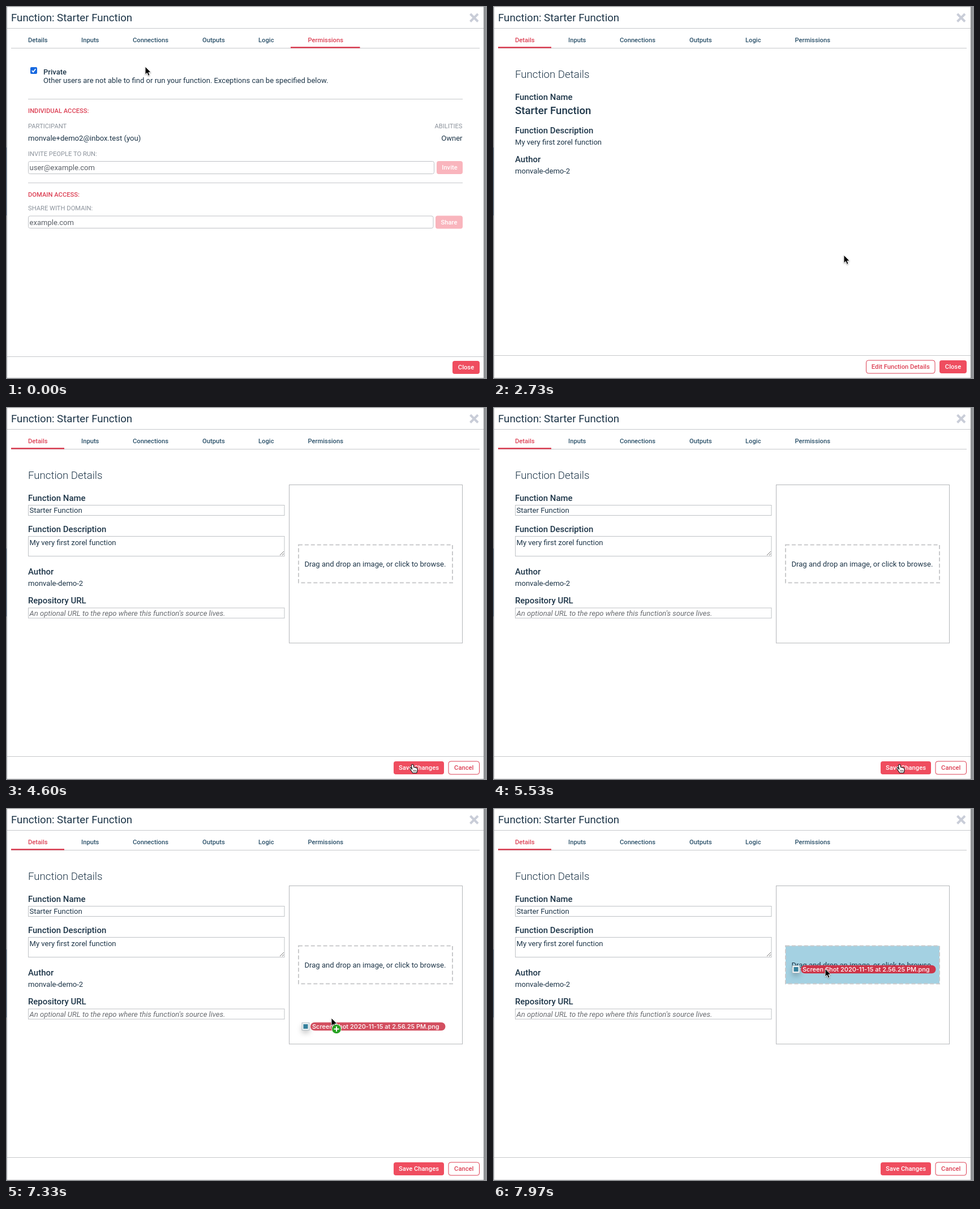
An HTML page that plays this animation: 850 by 659 pixels, repeating every 8000 ms.

```html
<!DOCTYPE html>
<html lang="en">
<head>
<meta charset="utf-8">
<title>Function settings</title>
<style>
html, body { margin: 0; width: 100%; height: 100%; overflow: hidden; background: #fff; }
svg { display: block; width: 850px; height: 659px; font-family: Roboto, sans-serif; }
text { white-space: pre; }
</style>
</head>
<body>
<svg id="stage" viewBox="0 0 850 659" xmlns="http://www.w3.org/2000/svg"></svg>
<script>
const LOOP = 8000;
const NAVY = '#1d3548', TAB = '#2a5069', RED = '#dc4054', BUTTON = '#ef4d5f', GREY = '#8b929b', RULE = '#c6c8cb';
const BODY = 13.05, SMALL = 11.2, LABEL = 14.95, HEAD = 18.65;

const TABS = [['Details', 39], ['Inputs', 133], ['Connections', 224], ['Outputs', 347], ['Logic', 446], ['Permissions', 533.5]];

// Cursor stops: time, x, y of the hot spot
const PATH = [
  [0, 246, 107], [80, 246, 107], [1050, 54, 58], [1900, 54, 58], [2640, 620, 440], [2800, 620, 440],
  [3560, 718, 633], [5560, 718, 633], [5900, 705, 664], [6700, 700, 664], [7330, 575, 371], [7850, 587, 284], [8000, 587, 284]
];
const DETAILS_AT = 1800, EDIT_AT = 4060, DRAG_AT = 6700, DROP_AT = 7850;

const text = (str, x, y, size = BODY, weight = 400, fill = NAVY, extra = '') =>
  `<text x="${x}" y="${y}" font-size="${size}" font-weight="${weight}" fill="${fill}" ${extra}>${str}</text>`;
const rect = (x, y, w, h, fill, extra = '') =>
  `<rect x="${x}" y="${y}" width="${w}" height="${h}" fill="${fill}" ${extra}/>`;
const rule = (x1, x2, y, color = RULE) => rect(x1, y - .5, x2 - x1, 1, color);
const field = (x, y, w, h, r = 0) => rect(x + .5, y + .5, w - 1, h - 1, '#fff', `rx="${r}" stroke="#bfc2c6"`);
const group = (id, body) => `<g id="${id}">${body}</g>`;

function button(label, x, y, w, solid = true, fill = BUTTON) {
  const box = solid ? rect(x, y, w, 23, fill, 'rx="4"')
                    : rect(x + .5, y + .5, w - 1, 23, '#fff', `rx="4" stroke="${RED}"`);
  return box + text(label, x + w / 2, y + 15.3, SMALL, 500, solid ? '#fff' : RED, 'text-anchor="middle"');
}

const frame = rect(0, 0, 850, 659, '#919396') + rect(0, 250, 1.2, 120, '#5d6b7d') +
  rect(844, 0, 1, 659, '#85878a') + rect(2, 1.5, 842, 655.5, '#fff') +
  text('Function: Starter Function', 9, 27, HEAD) + rule(2, 844, 39.5) +
  '<path d="M820.5 14l13.5 13.5M834 14l-13.5 13.5" stroke="#c9cdd8" stroke-width="4"/>' +
  rule(9, 837, 74.5) +
  TABS.map(([name, x], i) => text(name, x, 64, SMALL, 500, TAB, `id="tab${i}"`)).join('');

const permissions =
  rect(43, 108, 12, 12, '#1769e0', 'rx="2"') +
  '<path d="M45.8 114.2l2.3 2.4 4.2-5.4" fill="none" stroke="#fff" stroke-width="1.7"/>' +
  text('Private', 66, 121, BODY, 500) +
  text('Other users are not able to find or run your function. Exceptions can be specified below.', 66, 136) +
  rule(39, 807, 164.5) +
  text('INDIVIDUAL ACCESS:', 39, 189, SMALL, 500, RED) +
  text('PARTICIPANT', 39, 216, SMALL, 400, GREY) +
  text('ABILITIES', 806.5, 216, SMALL, 400, GREY, 'text-anchor="end"') +
  text('monvale+demo2@inbox.test (you)', 39, 238) +
  text('Owner', 806.5, 238, BODY, 400, NAVY, 'text-anchor="end"') +
  text('INVITE PEOPLE TO RUN:', 39, 265, SMALL, 400, GREY) +
  field(39, 274, 718, 23, 3) + text('user@example.com', 41.5, 290, BODY, 400, '#5b6067') +
  button('Invite', 761, 274, 46, true, '#f9b5bd') +
  rule(39, 807, 312.5) +
  text('DOMAIN ACCESS:', 39, 337, SMALL, 500, RED) +
  text('SHARE WITH DOMAIN:', 39, 361, SMALL, 400, GREY) +
  field(39, 370.5, 716.5, 22.5, 3) + text('example.com', 41.5, 386.5, BODY, 400, '#5b6067') +
  button('Share', 759, 370.5, 48, true, '#f9b5bd') +
  rule(2, 844, 619.5) + button('Close', 789, 627, 48);

const heading = text('Function Details', 39, 127, HEAD, 300) + text('Function Name', 39, 166, LABEL, 500) + rule(2, 844, 617.5);

const details = heading +
  text('Starter Function', 39, 191, HEAD, 500) +
  text('Function Description', 39, 225, LABEL, 500) + text('My very first zorel function', 39, 244.5) +
  text('Author', 39, 276, LABEL, 500) + text('monvale-demo-2', 39, 296) +
  rect(658, 626, 124, 25, '#d9a0a8', 'id="glow" rx="5" style="filter:blur(1.2px)"') +
  button('Edit Function Details', 659, 625.5, 122.5, false) + button('Close', 789, 626, 48);

const edit = heading +
  field(39, 173, 453.5, 19) + text('Starter Function', 41.5, 187) +
  text('Function Description', 39, 221, LABEL, 500) +
  field(39, 228, 453.5, 36) + text('My very first zorel function', 41.5, 243.5) +
  '<path d="M484 262l7-7M488 262l3-3" stroke="#777"/>' +
  text('Author', 39, 296, LABEL, 500) + text('monvale-demo-2', 39, 315.5) +
  text('Repository URL', 39, 347, LABEL, 500) + field(39, 354.5, 453.5, 19) +
  text("An optional URL to the repo where this function's source lives.", 41.5, 368.7, BODY, 400, '#686b70', 'font-style="italic"') +
  rect(500.5, 137.5, 306, 279.5, '#fff', 'stroke="#b4b6b9"') +
  rect(517, 243.5, 272, 67, '#fff', 'id="zone" stroke="#c9cacc" stroke-width="2" stroke-dasharray="7 3.9"') +
  text('Drag and drop an image, or click to browse.', 527.5, 282) +
  button('Save Changes', 685, 626, 89) + button('Cancel', 781.5, 625.5, 55.5, false);

const file = rect(-15, -6.5, 13, 13, '#eef3f5', 'stroke="#a9b4bb" stroke-width=".8" style="filter:drop-shadow(0 5px 4px #0003)"') +
  rect(-12.5, -4, 8, 8, '#35809c') +
  rect(0, -7.3, 238.5, 14.6, '#cd3549', 'id="pill" rx="7.3"') +
  text('Screen Shot 2020-11-15 at 2.56.25 PM.png', 3, 4, 11, 500, '#fff', 'style="font-family:Inter,sans-serif"');

const arrow = '<path d="M0 0V14.2L3.3 11.2L5.5 16.4L8.1 15.3L5.9 10.3H10.2Z" fill="#000" stroke="#fff" stroke-width="1" style="filter:drop-shadow(0 1px 1px #0005)"/>';
const hand = '<path d="M-.5-1.2C.8-2 1.8-1 2 0L2.8 3.8C3.5 3 4.7 3.2 5 4.2C5.8 3.5 6.9 3.9 7 4.9C8 4.4 8.9 5 9 6.2L9 9.5L7.7 13.5H.6C-.5 11.2-2.2 9.4-3.6 7.4C-4.4 6 -3-.0-1.2 6.5L-1.2 6.5L-.3 7.1L-1.7.5C-1.8-.3-1.3-1 -.5-1.2Z" fill="#fff" stroke="#111" stroke-width="1.1" stroke-linejoin="round"/>' +
  '<path d="M2.2 8.2V11.5M4.2 8.2V11.5M6.2 8.2V11.5" stroke="#111" stroke-width=".8"/>';
const badge = '<circle cx="9" cy="19.5" r="8.3" fill="#27a222" stroke="#fff" stroke-width=".8"/><path d="M4.5 19.5h9M9 15v9" stroke="#fff" stroke-width="2"/>';

const stage = document.getElementById('stage');
stage.innerHTML = frame + rect(9, 72.2, 94, 2.3, RED, 'id="hoverLine"') + rect(0, 72, 94, 2.5, RED, 'id="activeLine"') +
  group('permissions', permissions) + group('details', details) + group('edit', edit) + group('file', file) +
  group('cursor', group('arrow', arrow) + group('hand', hand) + group('badge', badge));

const el = id => document.getElementById(id);
const show = (id, on) => el(id).setAttribute('display', on ? 'inline' : 'none');
const set = (id, attrs) => { for (const k in attrs) el(id).setAttribute(k, attrs[k]); };
const clamp = v => Math.max(0, Math.min(1, v));
const ease = v => v * v * (3 - 2 * v);
const mix = (a, b, k) => a + (b - a) * k;

function cursorAt(t) {
  const i = Math.max(1, PATH.findIndex(p => p[0] > t));
  const [a, b] = [PATH[i - 1], PATH[i]];
  const k = ease((t - a[0]) / (b[0] - a[0]));
  return [mix(a[1], b[1], k), mix(a[2], b[2], k)];
}

function render(t) {
  const [x, y] = cursorAt(t);
  const page = t < DETAILS_AT ? 'permissions' : t < EDIT_AT ? 'details' : 'edit';
  const active = page === 'permissions' ? 5 : 0;
  const dragging = t >= DRAG_AT, dropped = t >= DROP_AT;
  const overTab = x > 9 && x < 103 && y > 42 && y < 74;
  const overEdit = page === 'details' && x > 659 && x < 781 && y > 625 && y < 650;
  const overSave = page === 'edit' && x > 685 && x < 774 && y > 625 && y < 650;
  const overZone = dragging && x > 516 && x < 790 && y > 243 && y < 311;
  const pointing = overTab || overEdit || (overSave && !dragging);

  for (const id of ['permissions', 'details', 'edit']) show(id, id === page);
  TABS.forEach((_, i) => set('tab' + i, { fill: i === active || (i === 0 && overTab) ? RED : TAB }));
  set('activeLine', active ? { x: 503, width: 122.5 } : { x: 9, width: 94 });
  show('hoverLine', overTab && active);
  set('hoverLine', { opacity: .5 });
  show('glow', overEdit);
  set('zone', { fill: overZone ? '#a4d1e2' : '#fff' });

  const k = ease(clamp((t - DROP_AT) / 110));
  show('file', dragging);
  set('file', { transform: `translate(${x - mix(37, 43, k)} ${y + mix(15, 1, k)})` });
  set('pill', { opacity: mix(.87, 1, k) });

  set('cursor', { transform: `translate(${x} ${y})` });
  show('arrow', !pointing);
  show('hand', pointing);
  show('badge', dragging && !dropped);
}

function tick(now) {
  render(now % LOOP);
  requestAnimationFrame(tick);
}
render(0);
requestAnimationFrame(tick);
</script>
</body>
</html>
```
